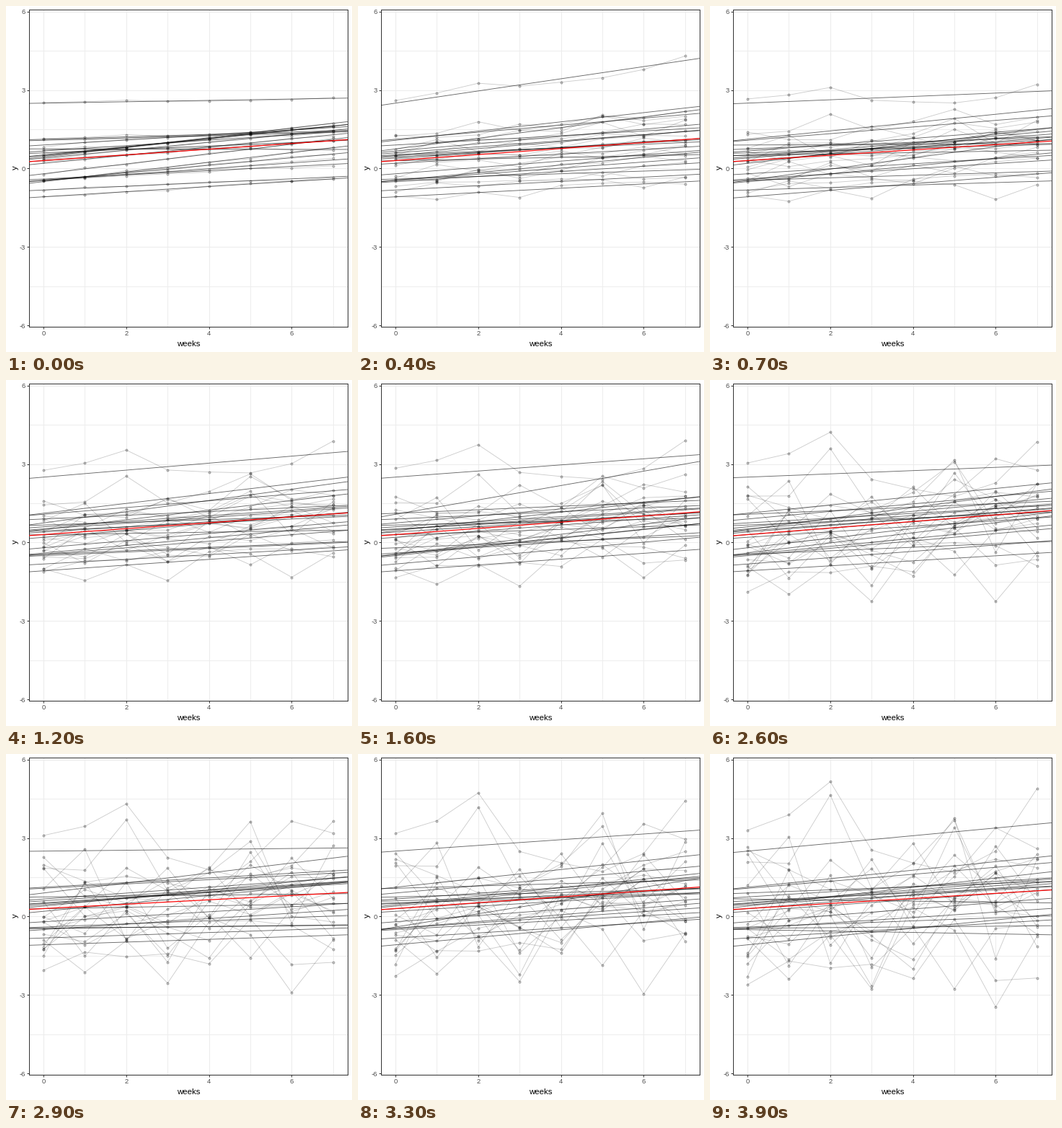
Animation, 480 px wide and 480 px high, one loop 4000 ms. Source, as a matplotlib script:

```python
import numpy as np
import matplotlib.pyplot as plt
from matplotlib.animation import FuncAnimation
from matplotlib.collections import LineCollection

SIZE, DPI, FRAMES = 480, 80, 40
PX = 72 / DPI  # one pixel in points
WEEKS = np.arange(8)
SPAN = np.array([-0.35, 7.35])

# Each subject keeps its intercept; the slope is drawn anew at every step.
INTERCEPTS = np.array([2.5, 1.12, 1.08, .9, .75, .67, .6, .52, .5, .45, .4,
                       .3, .2, -.2, -.4, -.45, -.45, -.5, -.82, -1.08])
HIGH, LOW = 0, 14
COUNT = len(INTERCEPTS)

rng = np.random.default_rng(8)
slopes = rng.normal(.113, .05, (FRAMES, COUNT))

# Residuals keep their shape and grow with the noise level.
residual = np.clip(rng.normal(0, .36, (COUNT, len(WEEKS))), -.8, .8)
residual[HIGH] = [.2, .31, .59, -.1, -.26, -.39, -.22, .34]
residual[LOW] = [-.55, -.34, -.42, -.4, -.55, 0, -.6, -.59]


def make_axes(fig):
    ax = fig.add_axes([32 / SIZE, 35 / SIZE, 441.8 / SIZE, 440 / SIZE])
    ax.set_xlim(SPAN)
    ax.set_ylim(-6.047, 6.074)
    ax.set_axisbelow(True)
    ax.set_xticks(WEEKS[::2])
    ax.set_xticks(WEEKS[1::2], minor=True)
    levels = range(-6, 7, 3)
    ax.set_yticks(levels, [str(v) for v in levels])
    ax.set_yticks(np.arange(-4.5, 5, 3), minor=True)
    ax.grid(which="major", color="#ebebeb", lw=PX)
    ax.grid(which="minor", color="#ededed", lw=PX)
    ax.tick_params(which="major", length=3 * PX, width=PX, pad=2 * PX,
                   color="#333333", labelcolor="#4d4d4d",
                   labelsize=9.4 * PX)
    ax.tick_params(which="minor", length=0)
    for spine in ax.spines.values():
        spine.set(color="#333333", linewidth=PX)
    return ax


def add_title(x, y, text, rotation=0):
    fig.text(x / SIZE, 1 - y / SIZE, text, size=11.4 * PX,
             rotation=rotation, ha="center", va="center")


def add_lines(alpha, width, z):
    lines = LineCollection([], colors=[(0, 0, 0, alpha)],
                           linewidths=width * PX, zorder=z)
    return ax.add_collection(lines, autolim=False)


plt.rcParams["font.family"] = "Liberation Sans"
fig = plt.figure(figsize=(SIZE / DPI, SIZE / DPI), dpi=DPI, facecolor="white")
ax = make_axes(fig)
add_title(253, 469, "weeks")
add_title(13, 224.5, "y", rotation=90)

paths = add_lines(.2, .9, 2)
fits = add_lines(.6, .9, 4)
dots, = ax.plot([], [], "o", ms=3 * PX, mew=.9 * PX, zorder=3,
                mfc=(0, 0, 0, .12), mec=(0, 0, 0, .36))
average, = ax.plot([], [], color="red", lw=1.2 * PX, zorder=5)


def draw(step):
    def fitted(x):
        return INTERCEPTS[:, None] + np.outer(slopes[step], x)

    noise = (step + 1) / 10
    y = fitted(WEEKS) + noise * residual
    ends = fitted(SPAN)
    paths.set_segments([np.column_stack([WEEKS, row]) for row in y])
    fits.set_segments([np.column_stack([SPAN, row]) for row in ends])
    dots.set_data(np.tile(WEEKS, COUNT), y.ravel())
    average.set_data(SPAN, ends.mean(axis=0))
    return paths, fits, dots, average


anim = FuncAnimation(fig, draw, frames=FRAMES, interval=100, repeat=True)
plt.show()
```
